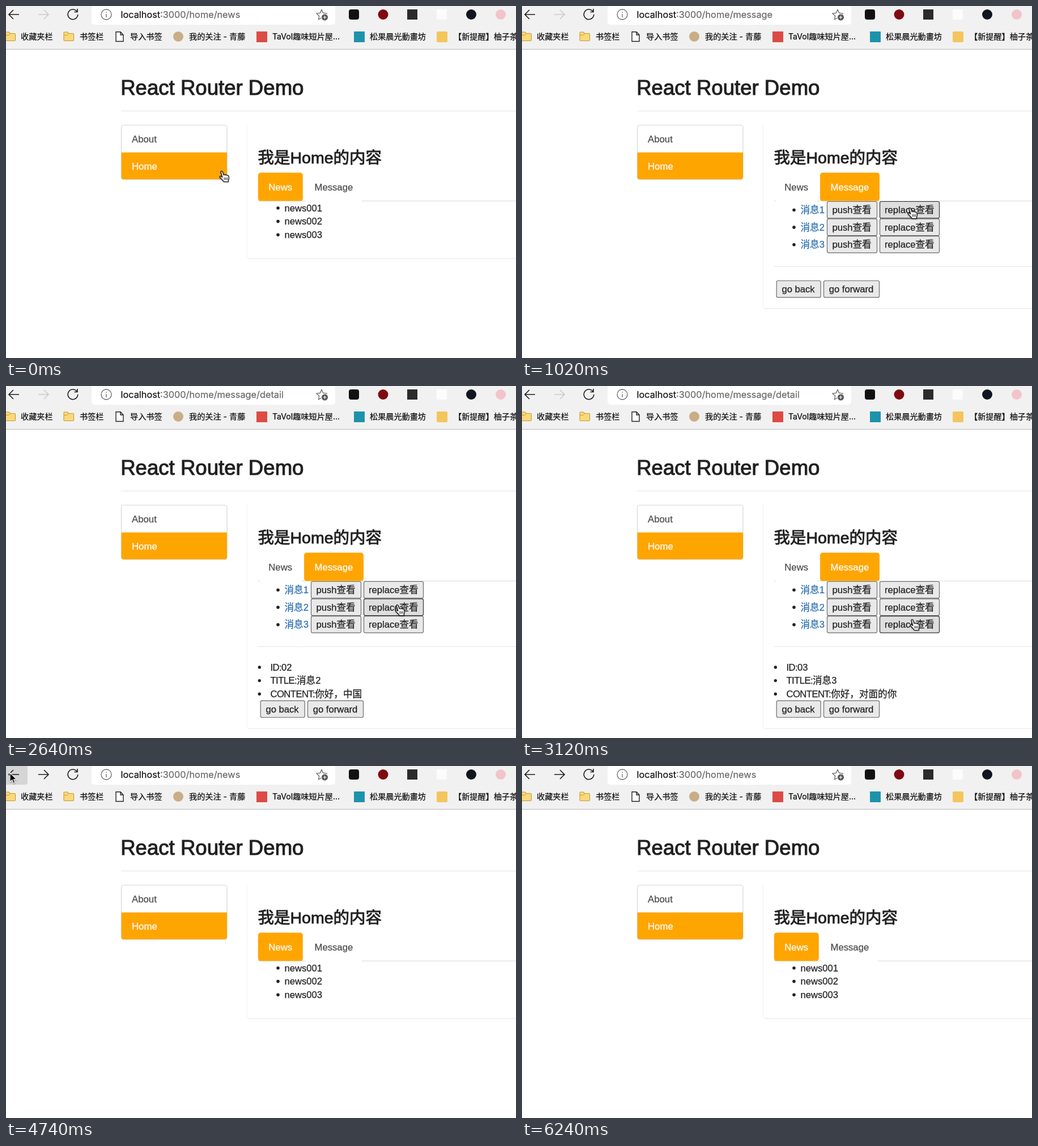
An HTML page with a canvas that plays this animation: 900 by 622 pixels, repeating every 6.3 s.

```html
<!DOCTYPE html>
<html lang="zh">
<head>
<meta charset="utf-8">
<title>React Router Demo</title>
<style>
html, body { margin: 0; width: 100%; height: 100%; overflow: hidden; background: #fff; }
canvas { display: block; width: 900px; height: 622px; }
</style>
</head>
<body>
<canvas id="stage" width="900" height="622"></canvas>
<script>
const ctx = document.getElementById('stage').getContext('2d');
const LOOP = 6300, STEP = 60;
const SANS = '"Liberation Sans", "Noto Sans CJK SC", "Noto Sans CJK", sans-serif';
const UI = 'Inter, "Noto Sans CJK SC", "Noto Sans CJK", sans-serif';
const ORANGE = '#ffa500', INK = '#212121';

// Pointer stops: time, x, y
const PATH = [
  [0, 381, 292], [60, 381, 292], [420, 578, 322], [660, 580, 324],
  [1020, 685, 357], [1380, 685, 357], [1860, 691, 387], [2640, 691, 387],
  [2940, 689, 413], [3300, 689, 413], [3900, 22, 36], [3960, 22, 36],
  [4260, 7, 12], [4860, 7, 12], [5200, 120, 210], [5800, 250, 470],
  [6180, 300, 650], [6300, 300, 650]
];
const DETAILS = [
  null,
  ['01', '消息1', '你好，世界'],
  ['02', '消息2', '你好，中国'],
  ['03', '消息3', '你好，对面的你']
];
const PRESSES = [1080, 1980, 2940];
const T_MESSAGE = 540, T_BACK = 4680;

function pointerAt(t) {
  let i = 0;
  while (i < PATH.length - 2 && t >= PATH[i + 1][0]) i++;
  const [t0, x0, y0] = PATH[i], [t1, x1, y1] = PATH[i + 1];
  const u = (t - t0) / (t1 - t0), k = u * u * (3 - 2 * u);
  return { x: x0 + (x1 - x0) * k, y: y0 + (y1 - y0) * k };
}

// A thin outline gives the slightly heavier text rendering
function text(str, x, y, size, color = INK, family = SANS, weight = .25) {
  ctx.font = size + 'px ' + family;
  ctx.fillStyle = ctx.strokeStyle = color;
  ctx.lineWidth = weight;
  ctx.fillText(str, x, y);
  ctx.strokeText(str, x, y);
  return ctx.measureText(str).width;
}

function box(x, y, w, h, r, fill, line, width = 1) {
  ctx.beginPath();
  ctx.roundRect(x, y, w, h, r);
  if (fill) { ctx.fillStyle = fill; ctx.fill(); }
  if (line) { ctx.strokeStyle = line; ctx.lineWidth = width; ctx.stroke(); }
}

function disc(x, y, r, fill) {
  ctx.beginPath();
  ctx.arc(x, y, r, 0, Math.PI * 2);
  ctx.fillStyle = fill;
  ctx.fill();
}

function stroke(d, color, width, x = 0, y = 0, fill) {
  const p = new Path2D(d);
  ctx.save();
  ctx.translate(x, y);
  if (fill) { ctx.fillStyle = fill; ctx.fill(p); }
  ctx.strokeStyle = color;
  ctx.lineWidth = width;
  ctx.stroke(p);
  ctx.restore();
}

const rule = (x, y, color, end = 900) => {
  ctx.fillStyle = color;
  ctx.fillRect(x, y, end - x, 1);
};

const inside = (p, x, y, w, h) => p.x >= x && p.x < x + w && p.y >= y && p.y < y + h;

function folder(x) {
  stroke('M1 2.5Q1 1 2.5 1H7L9.5 3.5H17Q18.5 3.5 18.5 5V15Q18.5 16.5 17 16.5H2.5Q1 16.5 1 15Z',
    '#c29a32', 1.1, x, 45, '#fbd97a');
  stroke('M1 6.5H7L9.5 3.8', '#c29a32', 1, x, 45);
}

function toolbar(p, page, canForward) {
  ctx.fillStyle = '#f1f1f1';
  ctx.fillRect(0, 0, 900, 76);
  rule(0, 76, '#b9b9b9');

  if (inside(p, 0, 0, 38, 34)) box(-4, -4, 42, 37, 4, '#d5d5d5');
  if (inside(p, 0, 35, 89, 36)) box(-4, 38, 93, 32, 4, '#e2e2e2');
  const arrow = 'M0 0H18';
  stroke(arrow + 'M8 -8L0 0L8 8', '#1d1d1d', 1.6, 5, 15);
  stroke(arrow + 'M10 -8L18 0L10 8', canForward ? '#1d1d1d' : '#cacaca', 1.6, 57, 15);
  stroke('M7 -5.5A8.8 8.8 0 1 0 8.8 0M8 -10V-4.5H2.5', '#1d1d1d', 1.6, 118, 15);

  box(151, -8, 430, 41, 5, '#fff');
  stroke('M9 0A9 9 0 1 1 -9 0A9 9 0 1 1 9 0M0 -1V5M0 -4.8V-3', '#666', 1.3, 177, 15);
  const w = text('localhost', 202.5, 21, 16.3, '#161616', UI);
  text(':3000/home/' + page, 202.5 + w, 21, 16.3, '#6a6a6a', UI);
  stroke('M0 -9L2.7 -3.2L9 -2.4L4.4 2L5.5 8.2L0 5.2L-5.5 8.2L-4.4 2L-9 -2.4L-2.7 -3.2Z',
    '#666', 1.3, 557, 15.5);
  disc(562.5, 20, 6.5, '#fff');
  disc(562.5, 20, 5.5, '#555');
  stroke('M-3 0H3M0 -3V3', '#fff', 1.2, 562.5, 20);

  box(605, 6, 18, 18, 4, '#111');
  disc(665.5, 15, 9, '#800a12');
  box(708, 6, 18, 18, 0, '#2b2b2b');
  box(760, 6, 18, 18, 0, '#fcfcfc');
  disc(821, 15, 9, '#10151f');
  disc(873, 15, 9, '#f3c3cb');

  folder(-2);
  folder(101);
  stroke('M1 .8H9L14 6V17.5H1ZM9 .8V6H14', '#222', 1.4, 193, 45, '#fff');
  disc(304, 54, 9, '#c9ad86');
  box(442, 45, 19, 19, 0, '#dd4b45');
  box(614, 45, 19, 19, 0, '#1d93ab');
  box(760, 45, 19, 19, 2, '#f3c55c');
  const marks = [
    ['收藏夹栏', 26], ['书签栏', 130], ['导入书签', 219], ['我的关注 - 青藤', 323],
    ['TaVol趣味短片屋...', 470], ['松果晨光動畫坊', 642], ['【新提醒】柚子茶', 790]
  ];
  for (const [name, x] of marks) text(name, x, 59, 14.15, '#111', UI);
}

function button(label, x, y, w, pad, p, pressed) {
  const hover = inside(p, x, y, w, 30);
  const fill = hover ? (pressed ? '#f5f5f5' : '#dedede') : '#e9e9e9';
  const line = hover ? (pressed ? '#8d8d8d' : '#333') : '#6b6b6b';
  box(x + .5, y + .5, w - 1, 29.4, 2.5, fill, line, 1.2);
  text(label, x + pad, y + 21, 16.6);
  return hover;
}

function tab(label, x, w, active, cover) {
  if (active) box(x, 294.6, w, 50, 4.5, ORANGE);
  else {
    ctx.fillStyle = '#fff';
    ctx.fillRect(cover[0], 343, cover[1] - cover[0], 3);
  }
  text(label, x + 18.5, 326, 16.7, active ? '#fff' : '#4c4c4c');
}

function detail(rec) {
  ['ID:', 'TITLE:', 'CONTENT:'].forEach((label, i) => {
    const y = 497 + i * 23.6;
    disc(447.3, y, 2.7, INK);
    ctx.letterSpacing = '-0.6px';
    const w = text(label, 466.5, y + 5.7, 16.7);
    ctx.letterSpacing = '0px';
    text(rec[i], 466.5 + w, y + 5.7, 16.6);
  });
}

function messages(p, id, pressed) {
  let hot = false;
  for (let i = 0; i < 3; i++) {
    const y = 345 + i * 30.6;
    disc(480, y + 15.5, 2.8, INK);
    text('消息' + (i + 1), 491.5, y + 21, 16.6, '#2a6fae');
    hot = button('push查看', 538, y, 89, 9.5, p, pressed) || hot;
    hot = button('replace查看', 631, y, 106, 9, p, pressed) || hot;
  }
  rule(445, 460, '#e4e4e4');
  if (id) detail(DETAILS[id]);
  const y = id ? 555.6 : 485;
  button('go back', 448.7, y, 79, 9.8, p, pressed);
  button('go forward', 532, y, 99, 9.8, p, pressed);
  return hot;
}

function news() {
  for (let i = 0; i < 3; i++) {
    const y = 357 + i * 23.6;
    disc(480, y, 2.8, INK);
    text('news00' + (i + 1), 491.5, y + 5.6, 16.6);
  }
}

function card(bottom) {
  stroke(`M425.5 210V${bottom - 4}Q425.5 ${bottom} 430 ${bottom}`, '#f1f1f1', 1);
  rule(429, bottom, '#e5e5e5');
}

function pointer(p, hand) {
  ctx.lineJoin = 'round';
  ctx.save();
  ctx.shadowColor = 'rgba(0,0,0,.35)';
  ctx.shadowBlur = 2;
  ctx.shadowOffsetY = 1;
  if (hand) {
    stroke('M-2 1.5Q-2 -.5 0 -.3Q1 0 1.5 1.5L3.2 6.5Q4.6 5 6 6.6Q7.6 5.4 8.8 7.2Q11.5 6.3 12 9.5' +
      'Q13 13 11.4 15.5L11.4 18.5H3.5Q1 15 -1.5 13Q-5 9.8 -3.5 8.8Q-2 8 .8 10.4Z',
      '#111', 1.2, p.x, p.y, '#fff');
    ctx.shadowColor = 'transparent';
    stroke('M4.2 11V15.5M6.7 11V15.5M9.2 11V15.5', '#111', 1, p.x, p.y);
  } else {
    stroke('M0 0V16L3.8 12.6L6.3 18.6L9 17.4L6.5 11.6H11.5Z', '#fff', 1.2, p.x, p.y, '#000');
  }
  ctx.restore();
  ctx.lineJoin = 'miter';
}

function draw(t) {
  const p = pointerAt(t);
  const onMessage = t >= T_MESSAGE && t < T_BACK;
  const pressed = PRESSES.some(s => t >= s && t < s + STEP);
  const id = onMessage ? PRESSES.filter(s => t >= s + STEP).length : 0;

  ctx.fillStyle = '#fff';
  ctx.fillRect(0, 0, 900, 622);
  toolbar(p, onMessage ? (id ? 'message/detail' : 'message') : 'news', t >= T_BACK);

  text('React Router Demo', 202.2, 156.5, 36.6, INK, SANS, 1.1);
  rule(203, 185, '#e4e4e4');

  box(203.5, 210.5, 186.5, 96, 4, null, '#d6d6d6', 1.2);
  box(203.6, 258.7, 186.4, 47.6, [0, 0, 4, 4], ORANGE);
  text('About', 222, 240.5, 16.8, '#4c4c4c');
  text('Home', 222, 289, 16.8, '#fff');

  card(onMessage ? (id ? 605 : 534) : 446);
  text('我是Home的内容', 444.5, 278, 28.5, INK, SANS, .9);
  rule(445, 344, '#d9d9d9');
  tab('News', 444.8, 79, !onMessage, [448, 521]);
  tab('Message', 526, 105, onMessage, [529, 628]);

  let hand = inside(p, 203, 210, 187, 97) ||
    inside(p, 445, 295, 79, 50) || inside(p, 526, 295, 105, 50);
  if (onMessage) hand = messages(p, id, pressed) || hand;
  else news();
  pointer(p, hand);
}

function tick(now) {
  draw(Math.floor((now % LOOP) / STEP) * STEP);
  requestAnimationFrame(tick);
}
draw(0);
requestAnimationFrame(tick);
</script>
</body>
</html>
```
